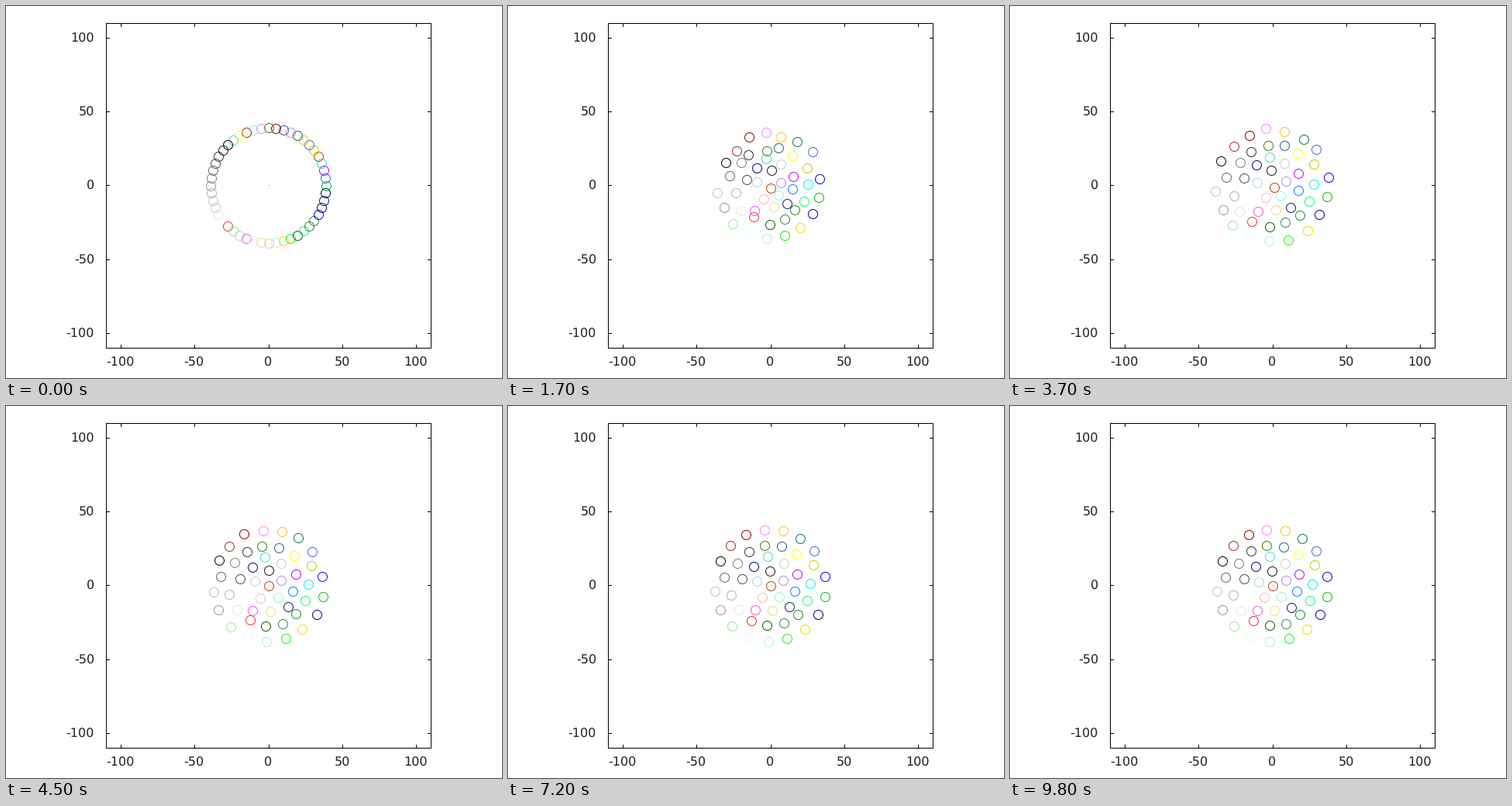
A matplotlib script for the animation above (9900 ms loop, 640 by 480 pixels).

```python
import numpy as np
import matplotlib.pyplot as plt
from matplotlib.animation import FuncAnimation
from matplotlib.collections import EllipseCollection

plt.rcParams["text.hinting"] = "none"

W, H, DPI = 640, 480, 100
PX = 72 / DPI                      # one pixel in points
FRAMES, STEP = 99, 100
LEFT, RIGHT, TOP, BOTTOM = 129, 548, 22, 441
SCALE = (RIGHT - LEFT) / 220       # pixels per data unit
CENTER = np.array([339.0, 232.0])
RING, RADIUS = 39 * SCALE, 6
SPREAD = 1.1                       # seconds until the ring has dissolved

greys = ["#000000", "#1a1a1a", "#333333", "#4d4d4d", "#666666", "#7f7f7f",
         "#999999", "#b3b3b3", "#c0c0c0", "#cccccc", "#e5e5e5", "#ffffff"]
colors = [
    "#00c000", "#0080ff", "#c000ff", "#00eeee", "#c04000", "#c8c800",
    "#4169e1", "#ffc020", "#008040", "#c080ff", "#306080", "#8b0000",
    "#408000", "#ff80ff", "#7fffd4", "#a52a2a", "#ffff00", "#40e0d0",
    *greys,
    "#f03232", "#90ee90", "#add8e6", "#f055f0", "#e0ffff", "#eedd82",
    "#ffb6c1", "#afeeee", "#ffd700", "#00ff00", "#006400", "#00ff7f",
    "#228b22", "#2e8b57", "#0000ff", "#00008b", "#191970", "#000080",
]
COUNT = len(colors)


def polar(radius, degrees):
    a = np.radians(degrees)
    return np.column_stack([radius * np.cos(a), -radius * np.sin(a)])


def turn(count, start):
    return start + 360 * np.arange(count) / count


ring = polar(RING, turn(COUNT, 0))

# Members of each shell, counterclockwise
outer = [6, 8, 7, 13, 11, 15, 18, 26, 24, 31, 34, 37, 39, 38, 45, 0, 44]
middle = [3, 5, 16, 10, 12, 20, 23, 22, 25, 28, 30, 40, 43, 42, 41]
inner = [2, 27, 17, 47, 21, 29, 33, 35, 46, 1]
core = [9, 19, 32, 36, 14]
heart = [4]

# The outer shell leaves two gaps, and two middle members bulge into them
arcs = np.append(np.linspace(38, 154, 7), np.linspace(186, 369, 10))
bulge = 52 + 9 * np.isin(np.arange(15), (1, 7))
zigzag = 35 + 2.5 * (-1) ** np.arange(10)

settled = np.zeros((COUNT, 2))
settled[outer] = polar(72, arcs)
settled[middle] = polar(bulge, turn(15, 2))
settled[inner] = polar(zigzag, turn(10, 23))
settled[core] = polar(18.5, turn(5, 21))
settled[heart] = 1, 1

rng = np.random.default_rng(4)
phase = rng.uniform(0, 2 * np.pi, (COUNT, 2))
period = rng.uniform(1.5, 3, (COUNT, 2))


def place(t):
    """Particle centres at t seconds."""
    u = min(t / SPREAD, 1)
    ease = u * u * (3 - 2 * u)
    since = t - SPREAD
    breath = 0.17 * np.exp(-since / 0.8) * np.cos(2 * np.pi * since / 1.3)
    wander = 5 * np.exp(-t / 3) * np.sin(2 * np.pi * t / period + phase)
    p = ring + (settled - ring) * ease
    return CENTER + p * (1 + ease * breath) + ease * wander


fig = plt.figure(figsize=(W / DPI, H / DPI), dpi=DPI, facecolor="white")
ax = fig.add_axes([0, 0, 1, 1])
ax.set_xlim(0, W)
ax.set_ylim(H, 0)
ax.axis("off")


def line(x, y):
    ax.plot(x, y, color="black", lw=PX, snap=True,
            solid_capstyle="projecting", solid_joinstyle="miter", zorder=1)


def label(x, y, text, align):
    ax.text(x, y, text, ha=align, va="baseline", color="#202020",
            family="DejaVu Sans", fontsize=16 * PX)


line([LEFT, RIGHT, RIGHT, LEFT, LEFT], [TOP, TOP, BOTTOM, BOTTOM, TOP])
for value in range(-100, 101, 50):
    x = np.floor(339 + value * SCALE)
    y = np.floor(231.9 - value * SCALE)
    for edge, inward in ((LEFT, 4), (RIGHT, -4)):
        line([edge, edge + inward], [y, y])
    for edge, inward in ((TOP, 4), (BOTTOM, -4)):
        line([x, x], [edge, edge + inward])
    label(114, y + 5.5, str(value), "right")
    label(x - 0.5, 465, str(value), "center")

# Mark at the origin
ax.add_patch(plt.Rectangle((339, 231), 1, 1, color="#808080", lw=0))

size = np.full(COUNT, 2 * RADIUS)
rings = EllipseCollection(size, size, np.zeros(COUNT), units="xy",
                          offsets=ring + CENTER,
                          offset_transform=ax.transData,
                          facecolors="none", edgecolors=colors,
                          linewidths=PX, zorder=3)
ax.add_collection(rings)


def draw(frame):
    # Circles sit on whole pixels
    rings.set_offsets(np.floor(place(frame * STEP / 1000)) + 0.5)
    return [rings]


anim = FuncAnimation(fig, draw, frames=FRAMES, interval=STEP,
                     repeat=True, repeat_delay=0)
plt.show()
```
